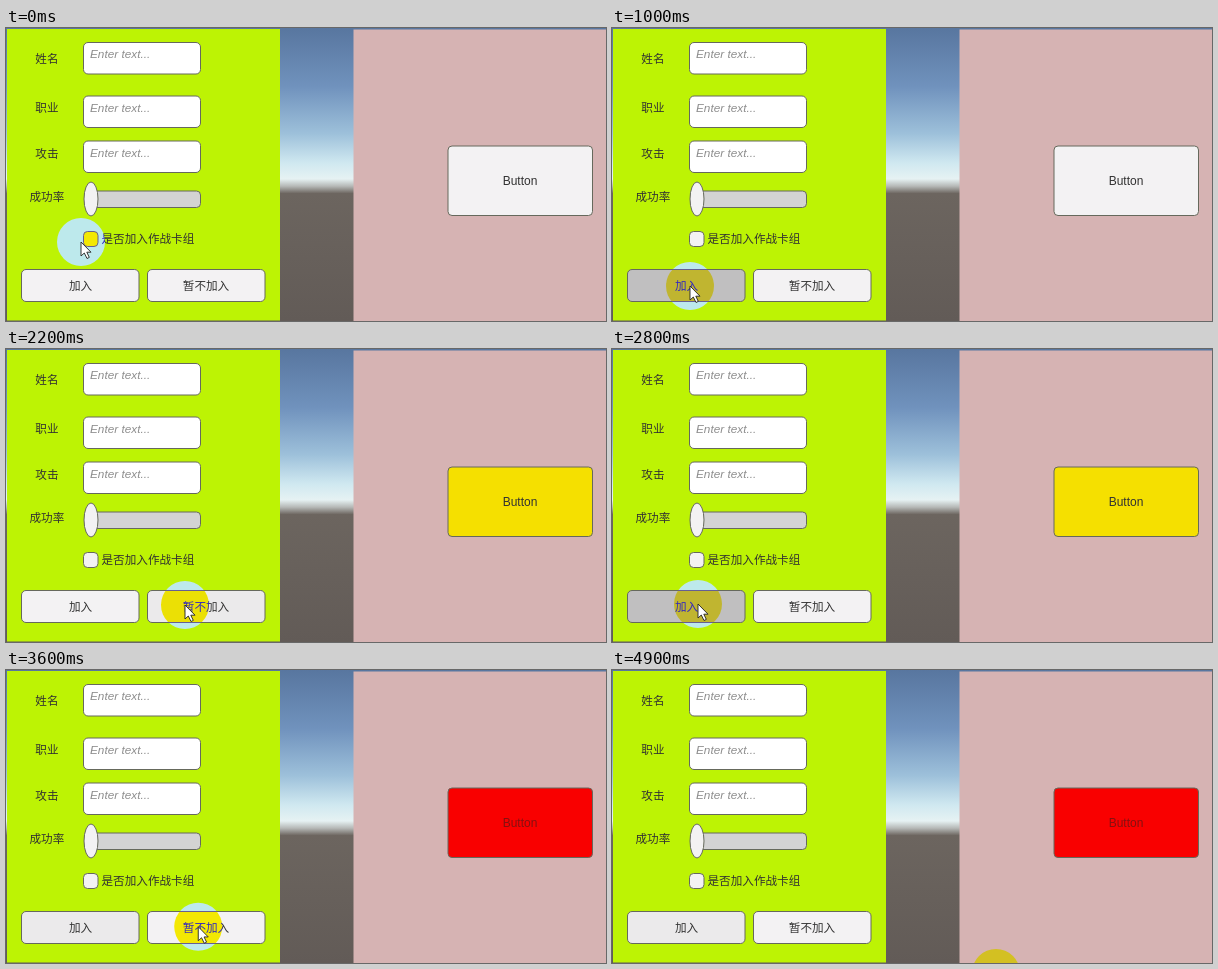
Recreate the animation shown at these times as an HTML page. Size 600x293 px, loop 5 s.

```html
<!DOCTYPE html>
<html lang="zh-CN">
<head>
<meta charset="utf-8">
<style>
  html, body { margin: 0; width: 100%; height: 100%; overflow: hidden; }
  svg { display: block; width: 600px; height: 293px; isolation: isolate; }
  text { font: 11.6px "Noto Sans CJK SC", "Noto Sans CJK", sans-serif; fill: #323232; }
  .latin { font: 12px "Liberation Sans", Arial, sans-serif; }
  .hint { font: italic 11.8px "Liberation Sans", Arial, sans-serif; fill: #8e8e8e; }
  .mid { text-anchor: middle; }
  .box { fill: #f3f2f3; stroke: #66695c; }
  .field { fill: #fff; }
</style>
</head>
<body>
<svg viewBox="0 0 600 293">
  <defs>
    <linearGradient id="sky" x2="0" y2="1">
      <stop offset="0" stop-color="#58769f"/>
      <stop offset=".2" stop-color="#7092bd"/>
      <stop offset=".36" stop-color="#9dc0da"/>
      <stop offset=".46" stop-color="#cfe8f0"/>
      <stop offset=".515" stop-color="#e6f2f3"/>
      <stop offset=".54" stop-color="#b5b8b6"/>
      <stop offset=".565" stop-color="#6c655f"/>
      <stop offset="1" stop-color="#625b57"/>
    </linearGradient>
  </defs>
  <rect width="600" height="293" fill="url(#sky)"/>
  <rect x="1" y="1" width="273" height="291.5" fill="#bdf304"/>
  <rect x="347.5" y="1.5" width="253" height="292" fill="#d6b3b3"/>

  <g id="fields"></g>
  <text x="23.5" y="172.5">成功率</text>
  <rect class="box" x="78.5" y="163" width="116" height="16.5" rx="4" style="fill:#d3d3d3"/>
  <ellipse class="box" cx="85" cy="171" rx="7" ry="17"/>
  <rect class="box" x="77.5" y="203.5" width="14.5" height="15" rx="4"/>
  <text x="95.5" y="214.7">是否加入作战卡组</text>

  <rect id="join" class="box" x="15.5" y="241.5" width="117.5" height="32" rx="4.5"/>
  <text class="mid" x="74.5" y="261.8">加入</text>
  <rect id="skip" class="box" x="141.5" y="241.5" width="117.5" height="32" rx="4.5"/>
  <text class="mid" x="200" y="261.8">暂不加入</text>

  <rect id="lamp" class="box" x="442" y="118" width="144.5" height="69.5" rx="4"/>
  <text id="lampText" class="latin mid" x="514" y="157">Button</text>

  <circle id="halo" r="24"/>
  <path id="arrow" d="M0 0V14L3.3 11L6 16.5L8.3 15.4L5.8 10.2H10Z" fill="#fff" stroke="#222" stroke-width=".9"/>
</svg>
<script>
const LOOP = 5000, STEP = 100;
const $ = id => document.getElementById(id);

$('fields').innerHTML = [['姓名', 14.5, 34.5], ['职业', 68, 83.5], ['攻击', 113, 129.5]].map(([label, y, base]) =>
  `<text x="29.3" y="${base}">${label}</text>
   <rect class="box field" x="77.5" y="${y}" width="117" height="31.5" rx="4.5"/>
   <text class="hint" x="84" y="${y + 15.7}">Enter text...</text>`).join('');

// Pointer path: time, x, y
const path = [
  [0, 75, 214], [200, 66, 198], [400, 72, 226], [600, 77, 256], [1000, 78, 258],
  [1100, 82, 258], [1200, 102, 257], [1500, 188, 258], [1600, 194, 258], [1800, 190, 258],
  [2000, 180, 256], [2400, 178, 256], [2500, 168, 256], [2700, 98, 255], [2800, 86, 255],
  [3300, 86, 255], [3500, 140, 250], [3900, 349, 277], [4100, 371, 304],
  [4300, 365, 306], [4500, 349, 290], [4700, 368, 298], [4900, 384, 303], [5000, 384, 303]
];

function pointerAt(t) {
  const i = path.findIndex(p => p[0] > t);
  const [t0, x0, y0] = path[i - 1], [t1, x1, y1] = path[i];
  const k = (t - t0) / (t1 - t0);
  return [x0 + (x1 - x0) * k, y0 + (y1 - y0) * k];
}

const within = (t, from, to) => t >= from && t < to;

function buttonColor(pressed, active) {
  return pressed ? '#c0bfc0' : active ? '#ebeaeb' : '#f3f2f3';
}

function draw(now) {
  const t = Math.floor(now % LOOP / STEP) * STEP;
  const [x, y] = pointerAt(t);

  const red = within(t, 1100, 2100) || t >= 3000;
  const yellow = within(t, 2100, 3000);
  $('lamp').style.fill = red ? '#f90000' : yellow ? '#f5e000' : '#f3f2f3';
  $('lampText').style.fill = red ? '#861010' : '#323232';

  $('join').style.fill = buttonColor(within(t, 900, 1100) || within(t, 2800, 3000),
    within(t, 600, 2000) || t >= 2700);
  $('skip').style.fill = buttonColor(within(t, 2000, 2100), within(t, 1400, 2600));

  // The halo inverts blue, except over the pink panel
  const overPink = x > 360;
  $('halo').style.mixBlendMode = overPink ? 'normal' : 'difference';
  $('halo').style.fill = overPink ? '#d3c022' : '#000af0';
  for (const id of ['halo', 'arrow']) $(id).setAttribute('transform', `translate(${x} ${y})`);

  requestAnimationFrame(draw);
}
requestAnimationFrame(draw);
</script>
</body>
</html>
```
